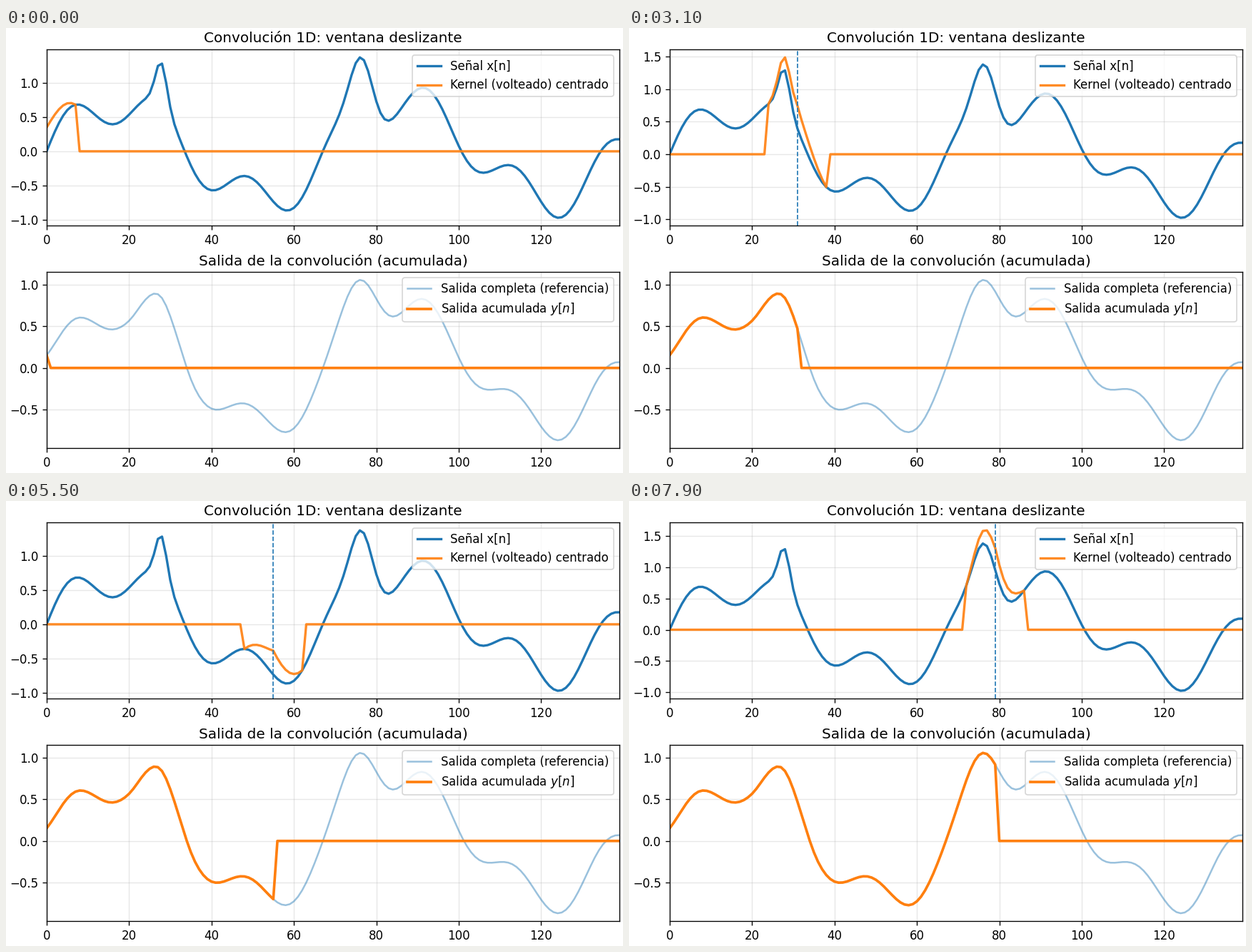
Animation, 864 px wide and 624 px high, one loop 8000 ms. Source, as a matplotlib script:

```python
import numpy as np
import matplotlib.pyplot as plt
from matplotlib.animation import FuncAnimation

N = 140
HALF = 7
FRAMES = 80
n = np.arange(N)
t = np.linspace(0, 4 * np.pi, N)


def bump(center, width):
    return np.exp(-0.5 * ((t - center) / width) ** 2)


x = (0.7 * np.sin(t) + 0.3 * np.sin(3.2 * t)
     + 0.6 * bump(0.8 * np.pi, 0.12) + bump(2.2 * np.pi, 0.25))
window = np.bartlett(2 * HALF + 1)
y = np.convolve(x, window / window.sum(), mode="same")


def sliding_kernel(i):
    """Triangular window centred on i, lifted onto the signal."""
    offset = n - i
    inside = np.abs(offset) <= HALF
    return np.where(inside, x + 0.35 * (1 - np.abs(offset) / HALF), 0)


def fit_y(ax, *curves):
    lo = min(c.min() for c in curves)
    hi = max(c.max() for c in curves)
    pad = 0.05 * (hi - lo)
    ax.set_ylim(lo - pad, hi + pad)


fig, (top, bottom) = plt.subplots(2, 1, figsize=(7.2, 5.2), dpi=120,
                                  layout="constrained")

top.set_title("Convolución 1D: ventana deslizante")
top.plot(n, x, color="C0", lw=2, label="Señal x[n]")
kernel_line, = top.plot(n, sliding_kernel(0), color="C1", lw=2, alpha=0.9,
                        label="Kernel (volteado) centrado")
cursor = top.axvline(0, color="C0", ls="--", lw=1)

bottom.set_title("Salida de la convolución (acumulada)")
bottom.plot(n, y, color="C0", lw=1.5, alpha=0.45,
            label="Salida completa (referencia)")
out_line, = bottom.plot(n, np.where(n <= 0, y, 0), color="C1", lw=2.2,
                        label="Salida acumulada $y[n]$")
fit_y(bottom, y)

for ax in (top, bottom):
    ax.set_xlim(0, N - 1)
    ax.grid(alpha=0.3)
    ax.legend(loc="upper right")


def update(i):
    kernel = sliding_kernel(i)
    kernel_line.set_ydata(kernel)
    cursor.set_xdata([i, i])
    out_line.set_ydata(np.where(n <= i, y, 0))
    fit_y(top, x, kernel)
    return kernel_line, cursor, out_line


# Solve the layout once, then keep the axes fixed.
update(0)
fig.canvas.draw()
fig.set_layout_engine("none")

anim = FuncAnimation(fig, update, frames=FRAMES, interval=100, repeat=True,
                     repeat_delay=0, blit=False)
plt.show()
```
